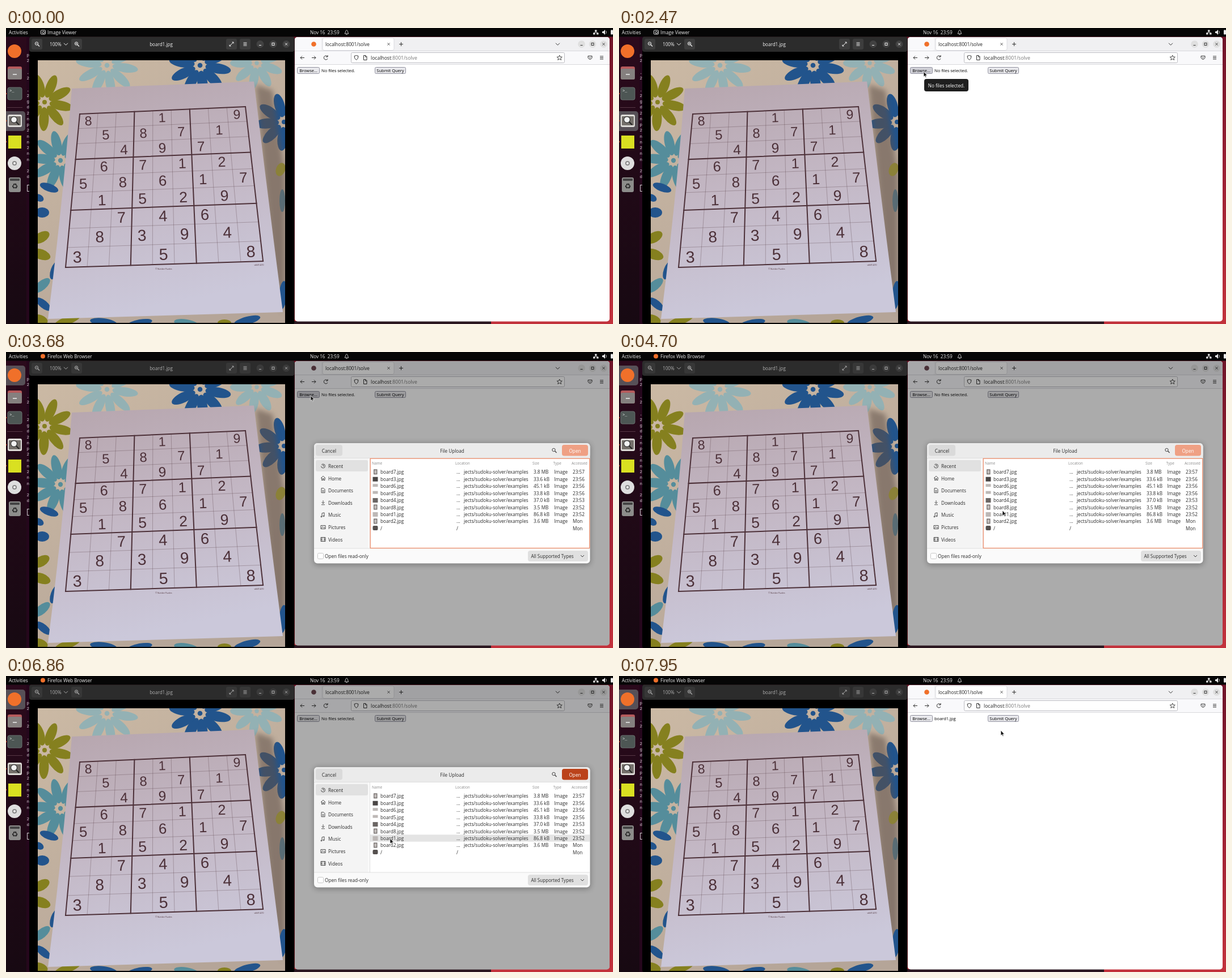
Recreate the animation shown at these times as an HTML page. Size 1070 by 523 pixels, loop 8 s.

```html
<!DOCTYPE html>
<html lang="en">
<head>
<meta charset="utf-8">
<title>Sudoku solver upload</title>
<style>
html, body { margin: 0; height: 100%; overflow: hidden; background: #000; }
svg { display: block; width: 100vw; height: 100vh; }
text { font: 8.2px "Open Sans", "Noto Sans", sans-serif; dominant-baseline: central; white-space: pre; }
.digit { font-family: "Liberation Sans", Arial, sans-serif; text-anchor: middle; }
.mono { font-family: "Liberation Mono", monospace; }
</style>
</head>
<body>
<svg id="stage" viewBox="0 0 1070 523">
  <defs>
    <linearGradient id="cloth" x2=".6" y2="1"><stop stop-color="#cbb9a4"/><stop offset="1" stop-color="#b5a598"/></linearGradient>
    <linearGradient id="paper" x2=".2" y2="1"><stop stop-color="#b6a5ad"/><stop offset=".5" stop-color="#c3b7c4"/><stop offset="1" stop-color="#cbc8da"/></linearGradient>
    <linearGradient id="dock" x2="0" y2="1"><stop stop-color="#2b0a1c"/><stop offset="1" stop-color="#170912"/></linearGradient>
    <linearGradient id="wall" x2="0" y2="1"><stop stop-color="#6d1428"/><stop offset=".5" stop-color="#9c2033"/><stop offset="1" stop-color="#c2323c"/></linearGradient>
    <clipPath id="photoClip"><rect x="56" y="57" width="436" height="464"/></clipPath>
    <clipPath id="termClip"><rect x="36" y="42" width="5" height="481"/></clipPath>
    <filter id="soft"><feGaussianBlur stdDeviation="5"/></filter>
  </defs>
</svg>
<script>
const stage = document.getElementById('stage');
const rect = (x, y, w, h, fill, r = 0, more = '') =>
  `<rect x="${x}" y="${y}" width="${w}" height="${h}" rx="${r}" fill="${fill}" ${more}/>`;
const circle = (x, y, r, fill, more = '') => `<circle cx="${x}" cy="${y}" r="${r}" fill="${fill}" ${more}/>`;
const line = (d, color, w = 1, more = '') => `<path d="${d}" fill="none" stroke="${color}" stroke-width="${w}" ${more}/>`;
const poly = (d, fill, more = '') => `<path d="${d}" fill="${fill}" ${more}/>`;
const text = (x, y, s, fill, size = 8.2, more = '') =>
  `<text x="${x}" y="${y}" fill="${fill}" style="font-size:${size}px" ${more}>${s}</text>`;
const bold = 'font-weight="700"', mid = 'text-anchor="middle"';
const group = (id, body, more = '') => `<g id="${id}" ${more}>${body}</g>`;
const cross = (x, y, r, c, w = 1) => line(`M${x - r} ${y - r}l${2 * r} ${2 * r}m0 ${-2 * r}l${-2 * r} ${2 * r}`, c, w);
const chevron = (x, y, r, c) => line(`M${x - r} ${y - r / 2}l${r} ${r}l${r} ${-r}`, c, 1);
const lens = (x, y, c) => circle(x, y, 2.7, 'none', `stroke="${c}"`) + line(`M${x + 2} ${y + 2}l3 3`, c, 1.2);
const menu = (x, y, c) => line(`M${x - 3} ${y - 2.5}h6m-6 2.5h6m-6 2.5h6`, c, 1);

// Petals around a centre; from and count pick which of the n petals exist
function flower(x, y, n, r, w, color, turn = 0) {
  let s = '';
  for (let i = 0; i < n; i++)
    s += `<ellipse cx="${x + r * .6}" cy="${y}" rx="${r * .42}" ry="${w}" fill="${color}" transform="rotate(${turn + i * 360 / n} ${x} ${y})"/>`;
  return s + circle(x, y, r * .08, color);
}
const blob = (x, y, rx, ry, color, turn = 0) =>
  `<ellipse cx="${x}" cy="${y}" rx="${rx}" ry="${ry}" fill="${color}" transform="rotate(${turn} ${x} ${y})"/>`;

// Perspective from the unit square to the printed grid
function onGrid(u, v) {
  const w = 1 - .01376 * u - .16 * v;
  return [(130 + 286.2 * u - 41.8 * v) / w, (152 - 14.91 * u + 203.3 * v) / w].map(n => +n.toFixed(1));
}

function sudoku() {
  const ink = '#4c3038';
  const rows = '8...1...9 .5.8.7.1. ..4.9.7.. .6.7.1.2. 5.8.6.1.7 .1.5.2.9. ..7.4.6.. .8.3.9.4. 3...5...8'.split(' ');
  let s = '';
  for (let i = 0; i <= 9; i++) {
    const k = i / 9, thick = i % 3 == 0;
    for (const [a, b] of [[onGrid(k, 0), onGrid(k, 1)], [onGrid(0, k), onGrid(1, k)]])
      s += line(`M${a}L${b}`, ink, thick ? 2 : .6, thick ? 'stroke-linecap="square"' : 'opacity=".5"');
  }
  rows.forEach((row, r) => [...row].forEach((d, c) => {
    if (d == '.') return;
    const [x, y] = onGrid((c + .5) / 9, (r + .5) / 9);
    s += text(x, y, d, ink, 23 + r * .7, `class="digit" transform="rotate(-2 ${x} ${y})"`);
  }));
  return s + text(278, 425, '© Number Puzzles', ink, 3.4, mid) + text(446, 418.5, 'sdk014210', ink, 3.4, mid);
}

function photo() {
  const olive = '#85801f', blue = '#22548c', teal = '#558d9b', pale = '#93b1b4';
  return `<g clip-path="url(#photoClip)">` + rect(56, 57, 436, 464, 'url(#cloth)') +
    flower(68, 131, 9, 50, 8.5, olive, 12) + flower(178, 66, 10, 54, 8, pale, 8) +
    flower(342, 66, 10, 54, 9, blue, 10) + flower(442, 62, 9, 46, 8, pale, 20) +
    flower(490, 166, 9, 50, 9, blue, 15) + flower(96, 234, 10, 52, 8.5, teal, 5) +
    blob(76, 282, 7, 17, blue, -70) + blob(64, 326, 12, 9, blue) + blob(58, 300, 9, 6, blue, 30) +
    blob(62, 370, 16, 9, olive, -30) + blob(62, 400, 17, 9, olive, 20) + blob(86, 428, 7, 17, blue, 20) +
    blob(63, 455, 18, 8, teal, -40) + blob(66, 488, 16, 7, blue, 40) + blob(60, 515, 14, 8, olive, 20) +
    blob(108, 517, 24, 7, olive, -20) + blob(172, 520, 24, 7, blue, 8) + blob(236, 521, 22, 6, blue, -10) +
    blob(318, 522, 22, 7, teal, 10) + blob(425, 517, 24, 7, blue, -15) + blob(385, 521, 12, 6, olive) +
    poly('M440 100L470 110L492 260V450L488 505L470 420Z', '#5f5046', 'opacity=".55" filter="url(#soft)"') +
    blob(488, 472, 7, 25, blue, 5) + blob(487, 305, 5, 20, '#596c74') +
    blob(484, 250, 8, 12, '#8b8138', 20) +
    poly('M116 107L437 94.500Q462 300 488 502L74 514Q100 310 116 107Z', 'url(#paper)') +
    sudoku() + '</g>';
}

function dockIcons() {
  return circle(15, 41, 12, '#f0702a') +
    rect(3, 68, 25, 23, '#b65a5c', 3) + rect(3, 72, 25, 19, '#85807f', 3) + line('M12 82h7', '#e8e8e8', 1.6) +
    rect(3, 105, 25, 22, '#4d5654', 3, 'stroke="#69716f"') + text(6, 111, '&gt;_', '#eee', 7, 'class="mono"') +
    line('M2 140.500h27', '#573746', 1) +
    rect(3, 153, 25, 22, '#dedcd8', 3) + rect(5, 156, 21, 16, '#75706b', 1) +
    circle(14, 162, 5.500, '#f2f2f2', 'stroke="#333" stroke-width="1.300"') + line('M18 166l5 5', '#222', 2) +
    rect(4, 190, 23, 23, '#d9e021') +
    circle(15, 239, 12, '#dedede') + circle(15, 239, 4, '#888') + circle(15, 239, 2, '#fff') +
    rect(5, 264, 21, 26, '#8d8d8b', 3) + rect(7, 266, 17, 4, '#444', 1) +
    text(15.500, 279, '♻', '#222', 13, mid + ' font-family="DejaVu Sans"');
}

function desktop() {
  const rows = 'p2 .2 .2gd2np2nn2nn 2d';
  const term = [...rows].map((c, i) => text(36.500, 48 + i * 10.250, c, '#d8cfd5', 7.500, 'class="mono"')).join('');
  return rect(0, 0, 1070, 523, 'url(#wall)') + rect(505, 518, 350, 5, '#2b1720') +
    rect(0, 15, 37, 508, 'url(#dock)') + rect(36, 15, 7, 508, '#25071c') +
    `<g clip-path="url(#termClip)">${term}</g>` + rect(37.500, 277.500, 6, 11, 'none', 0, 'stroke="#ccc"') +
    group('dockMark', rect(-4, 147, 38, 35, '#575057', 5)) +
    [116, 164, 201].map(y => circle(0, y, 1.2, '#e95420')).join('') + dockIcons() +
    rect(0, 0, 1070, 15.500, '#060606') + text(5, 7.500, 'Activities', '#eee') +
    text(536, 7.500, 'Nov 16  23:59', '#eee') +
    line('M597 10h7c-2-2-1-6-3.500-6s-1.500 4-3.500 6m2.500 1.500h2', '#ddd', .9) +
    rect(1038, 3.500, 3.500, 3, '#ddd') + rect(1035, 8.500, 3.500, 3, '#ddd') + rect(1041, 8.500, 3.500, 3, '#ddd') +
    line('M1039.700 6v2m-3 1v-1h6v1', '#ddd', .8) +
    poly('M1051 6h2l3-3v9l-3-3h-2z', '#eee') + line('M1057.500 5q2 2.500 0 5', '#ddd', .9) + rect(1066, 3.500, 4, 8, '#eee', 1) +
    group('appViewer', rect(61.500, 4, 8, 7, 'none', 1, 'stroke="#ddd"') + circle(66, 8, 2, '#060606', 'stroke="#ddd"') +
      text(73, 7.500, 'Image Viewer', '#eee')) +
    group('appFirefox', circle(65, 7.500, 4, '#f0702a') + text(73, 7.500, 'Firefox Web Browser', '#eee'));
}

function viewer() {
  const c = '#f2f2f2', btn = x => rect(x, 19, 19, 19, '#3d3d3d', 3);
  return rect(41, 15.500, 467.500, 508, '#000', 4) + rect(41, 15.500, 467.500, 26.500, '#2c2c2c', 4) +
    group('viewerBar', btn(45) + lens(54, 27.500, c) + line('M52.500 27.500h3', c, .8) +
      text(77, 28.500, '100%', c) + chevron(105.500, 28.500, 3.500, c) +
      btn(115) + lens(124, 27.500, c) + line('M122.500 27.500h3m-1.500-1.500v3', c, .8) +
      text(273.500, 28.500, 'board1.jpg', c, 8.1, bold + mid.padStart(21)) +
      btn(388) + line('M398.500 25h2.500v2.500m0-2.500l-7 7m0-2.500v2.500h2.500', c) + btn(412) + menu(421.500, 28.500, c) +
      [448, 471, 494].map(x => circle(x, 28.500, 6.500, '#424242')).join('') +
      line('M446 30.500h4', c) + rect(469, 26.500, 4, 4, 'none', 0, `stroke="${c}"`) + cross(494, 28.500, 2, c)) +
    photo();
}

function button(id, x, w, label) {
  return rect(x + .5, 69.500, w, 11, '#e9e9ed', 2, `id="${id}" stroke="#8f8f9d"`) + text(x + (w + 1) / 2, 75.3, label, '#000', 7.5, mid);
}

function browser() {
  const c = '#333';
  return rect(509, 16, 555, 502.500, '#fff', 5) + rect(509, 16, 555, 25, '#f0f0f2', 5) +
    rect(509, 40, 555, 24.500, '#f9f9fb') + line('M509 40.500H1064M509 64.500H1064', '#d0d0d5', .8) +
    rect(509, 17, 47, 23, '#f9f9fb', 4) + rect(558, 17.500, 126, 22, '#fff', 3, 'stroke="#d4d4da" stroke-width=".8"') +
    `<circle id="favicon" cx="542.500" cy="28.500" r="4.300"/>` +
    text(563, 28.500, 'localhost:8001/solve', '#222') + cross(674.500, 28.500, 2, c, .9) +
    line('M696.500 25v7m-3.500-3.500h7', c) + chevron(972.500, 28.500, 3.500, c) +
    [1014.500, 1034, 1053.500].map(x => circle(x, 28.500, 6.300, '#dfdfdf')).join('') +
    line('M1012.500 30.500h4', c) + rect(1032, 26.500, 4, 4, 'none', 0, `stroke="${c}"`) + cross(1053.500, 28.500, 2, c) +
    line('M526 52.500h-7m3-3l-3 3l3 3M539 52.500h7m-3-3l3 3l-3 3', c) +
    line('M567 51a3.500 3.500 0 1 0 0 3m0-6v3h-3', c) +
    rect(608.500, 43.500, 376, 18, '#fff', 2, 'stroke="#b4b4ba" stroke-width=".9"') +
    line('M617.500 48.500l3.500 1q0 5-3.500 7q-3.500-2-3.500-7z', c) + line('M630.500 48.500h3.500l2 2v6h-5.500zm3 0v2.500h2.500', c) +
    text(643, 52.800, 'localhost<tspan fill="#777">:8001/solve</tspan>', '#222', 8.6) +
    poly('M975.700 48l1.300 3l3.300.2l-2.500 2.100l.8 3.200l-2.900-1.800l-2.900 1.800l.8-3.200l-2.500-2.100l3.300-.2z', 'none', `stroke="${c}" stroke-width=".9"`) +
    line('M1026 49.500h7v3q-3.500 6-7 0zm1.700 2l1.800 1.800l1.800-1.800', c) + menu(1050, 52.500, c) +
    button('browse', 513, 39, 'Browse…') + `<text id="chosen" x="556" y="75.300" style="font-size:7.500px"></text>` +
    button('submit', 650, 54, 'Submit Query') +
    rect(509, 16, 555, 502.500, '#000', 5, 'id="dim" opacity=".33"');
}

function dialog() {
  const c = '#3d3d3d', dark = '#2b2b2b';
  const places = 'Recent Home Documents Downloads Music Pictures Videos'.split(' ');
  const glyphs = ['M-3.500 0a3.500 3.500 0 1 0 3.500-3.500q-2 0-3 1.500m3-.5v2.500h2', 'M-4 0l4-4l4 4m-6.500-1v4.500h2v-3h1.500v3h2v-4.500',
    'M-3-4h4l2 2v6h-6zm1.500 4h3m-3 2h3', 'M0-4v5m-2.500-2l2.500 2.500l2.500-2.500M-3 3.500h6',
    'M-2 3v-6l4-1v6M-2 3a1 1 0 1 1-1-1zM2 2a1 1 0 1 1-1-1z', 'M-4-3h8v6h-8zm1 5l2-3l2 2l1-1l1.500 2', 'M-4-3.500h8v7h-8zm2 0v7m4-7v7m-6-3.500h2m4 0h2'];
  const files = ['7 3.8 MB 23:57', '3 33.6 kB 23:56', '6 45.1 kB 23:56', '5 33.8 kB 23:56', '4 37.0 kB 23:53',
    '8 3.5 MB 23:52', '1 86.8 kB 23:52', '2 3.6 MB Mon'];
  const rowY = i => 211.800 + i * 12.450;
  return rect(542, 161, 489, 216, '#000', 8, 'opacity=".25" filter="url(#soft)"') +
    rect(543, 161, 486.500, 212.500, '#fafafa', 6) + rect(543, 161, 486.500, 27, '#ebebeb', 6) +
    rect(543, 187, 95.500, 160, '#f4f4f4') + rect(641.500, 188, 387.500, 159, '#fff') +
    line('M543 187.500h486M543 347h486M641.500 188v159', '#d9d9d9', .8) +
    rect(546, 164, 47, 19.500, '#dadada', 4) + text(569.500, 174, 'Cancel', dark, 8.2, bold + ' ' + mid) +
    text(786.500, 174, 'File Upload', dark, 8.2, bold + ' ' + mid) + lens(965.500, 173, c) +
    `<rect id="open" x="980" y="164" width="46" height="19.500" rx="4"/>` + text(1003, 174, 'Open', '#fff', 8.2, bold + ' ' + mid) +
    rect(546, 191, 92, 20, '#e1e1e1', 3) +
    places.map((p, i) => {
      const y = 201.500 + i * 21.600;
      return line(glyphs[i], c, .9, `transform="translate(559 ${y})"`) + text(568, y, p, dark);
    }).join('') +
    [[645, 'Name'], [792, 'Location'], [928, 'Size'], [964.500, 'Type'], [997, 'Accessed']].map(([x, s]) => text(x, 196.300, s, '#8c8c8c', 6.5, bold)).join('') +
    rect(642, 280.300, 387, 12.400, '#e4e4e4', 0, 'id="picked"') +
    files.map((f, i) => {
      const [n, size, unit, when] = f.split(' '), y = rowY(i), tall = '7 8 2'.includes(n);
      return (tall ? rect(648, y - 4.500, 6.500, 9, '#77716f') + rect(649.200, y - 3, 4, 6, '#c2bdbb')
        : rect(646.500, y - 3.500, 9, n == '6' || n == '5' ? 5 : 8, { 3: '#4a4645', 4: '#6b6664' }[n] || '#bdb8b6')) +
        text(660, y, `board${n}.jpg`, dark) + text(794, y, '...', dark) + text(807, y, 'jects/sudoku-solver/examples', dark) +
        text(930, y, `${size} ${unit}`, dark) + text(966.500, y, 'Image', dark) + text(999, y, when, dark);
    }).join('') +
    rect(646.500, 307, 9, 8, '#55504e', 2) + text(660, rowY(8), '/', dark) + text(794, rowY(8), '/', dark) + text(999, rowY(8), 'Mon', dark) +
    rect(642.200, 188.200, 386.500, 158.300, 'none', 0, 'id="focus" stroke="#ef8a66" stroke-width="1.200"') +
    rect(549.500, 355.500, 10, 10, '#fff', 2, 'stroke="#c8c8c8"') + text(562, 360.500, 'Open files read-only', dark) +
    rect(920, 351, 106, 19, '#e0e0e0', 4) + text(925.500, 360.500, 'All Supported Types', dark, 8.1, bold) + chevron(1016, 360.500, 3, c);
}

stage.innerHTML += desktop() + viewer() + browser() +
  group('dialog', dialog()) +
  group('tip', rect(538, 90, 78, 22, '#1f1f1f', 4) + text(577, 101, 'No files selected.', '#fff', 8.2, mid)) +
  group('cursor', poly('M0 0V9.200L2.100 7.400L3.600 10.600L5 10L3.600 6.900H6.400Z', '#111', 'stroke="#fff" stroke-width=".7"'));

const el = id => document.getElementById(id);
const show = (id, on) => el(id).style.display = on ? '' : 'none';
const attr = (id, name, value) => el(id).setAttribute(name, value);
const part = (t, a, b) => Math.min(1, Math.max(0, (t - a) / (b - a)));

// Pointer moves: start, end, from, to
const moves = [
  [800, 1540, [926, 395], [537, 77]],
  [3950, 4700, [537, 77], [676, 280]],
  [4770, 4840, [676, 280], [676, 287]],
  [5580, 5581, [676, 287], [677, 287]],
  [7190, 7950, [677, 287], [673, 96]]
];
function pointer(t) {
  const [a, b, from, to] = moves.filter(m => t >= m[0]).pop() || moves[0];
  const k = part(Math.floor((t - a) / 67.5) * 67.5 + a, a, a + Math.floor((b - a) / 67.5) * 67.5 || b);
  const e = b - a < 2 ? 1 : k * k * (3 - 2 * k);
  return from.map((p, i) => p + (to[i] - p) * e);
}

function draw(t) {
  const modal = t >= 3680 && t < 7190, web = t >= 2690;
  show('appViewer', !web);
  show('appFirefox', web);
  attr('dockMark', 'transform', `translate(0 ${web ? -123 : 0})`);
  attr('viewerBar', 'opacity', web ? .65 : 1);
  attr('browse', 'fill', t >= 1610 && t < 3950 ? '#d0d0d7' : '#e9e9ed');
  el('chosen').textContent = t >= 7190 ? 'board1.jpg' : 'No files selected.';
  attr('favicon', 'fill', modal ? '#6d4752' : '#f0702a');
  show('tip', t >= 2220 && t < 3220);
  show('dim', modal);
  show('dialog', modal);
  show('picked', t >= 5170);
  const k = part(t, 5170, 5380), mix = (a, b) => Math.round(a + (b - a) * k);
  attr('open', 'fill', t >= 6460 ? '#bb431b' : `rgb(${mix(239, 233)},${mix(160, 84)},${mix(132, 32)})`);
  attr('focus', 'opacity', 1 - part(t, 5980, 6180));
  show('cursor', t >= 800);
  attr('cursor', 'transform', `translate(${pointer(t)})`);
}

const start = performance.now();
function tick() {
  draw((performance.now() - start) % 8000);
  requestAnimationFrame(tick);
}
tick();
</script>
</body>
</html>
```
